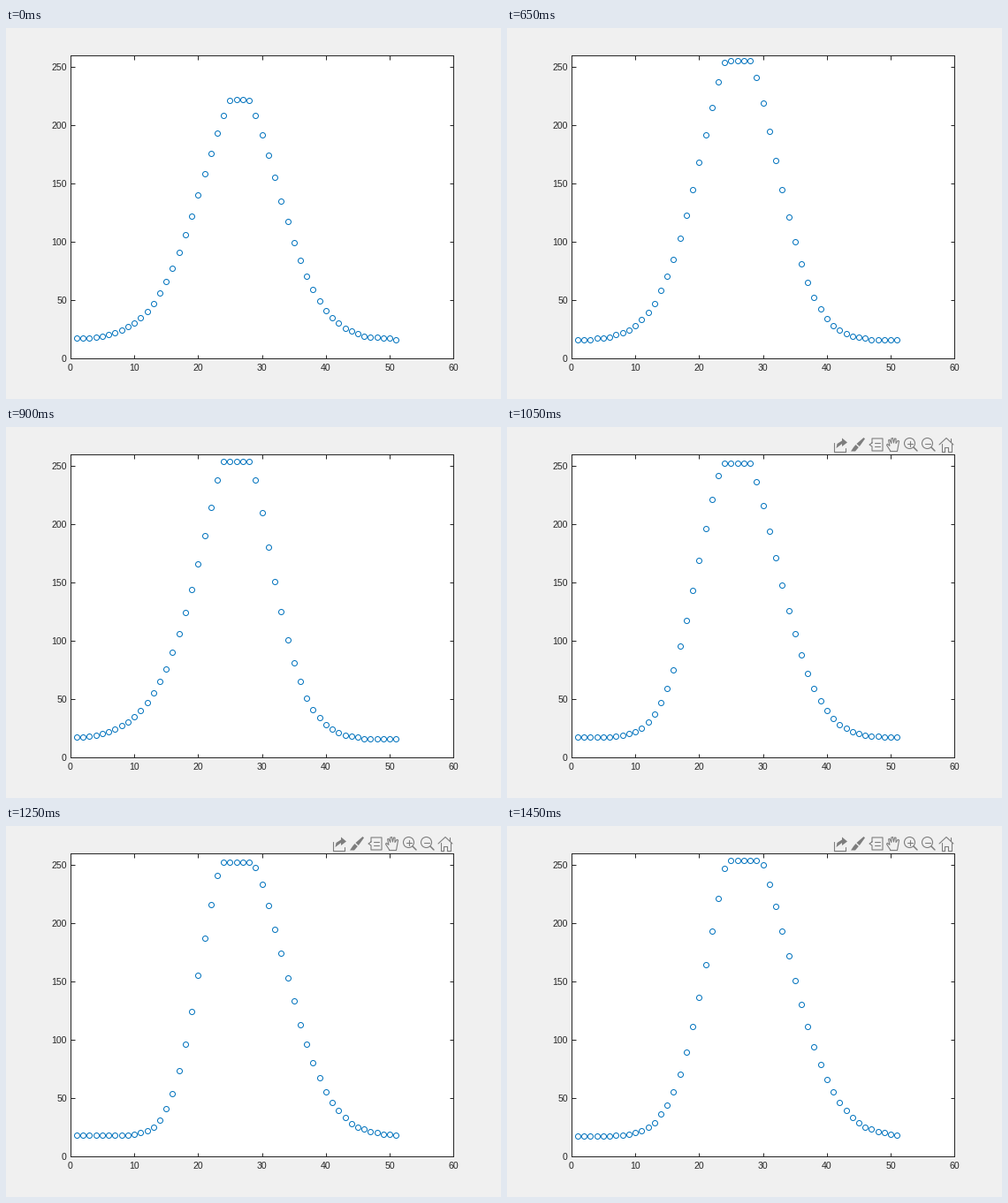
Animation, 560 px wide and 420 px high, one loop 1.5 s. Source, as a matplotlib script:

```python
import numpy as np
import matplotlib.pyplot as plt
from matplotlib.animation import FuncAnimation
from matplotlib.patches import Circle, Polygon

W, H, DPI = 560, 420, 80
PX = 72 / DPI  # points per pixel
FRAMES, INTERVAL = 30, 50
TOOLBAR_START = 21
INK, BLUE, GREY = "#262626", "#0072BD", "#7d7d7d"

plt.rcParams["font.family"] = "Liberation Sans"

X = np.arange(1, 52)


def bell(base, peak, cap, centre, left, left_power, right, right_power):
    """Lopsided bell that saturates at cap; left and right are half-widths."""
    d = X - centre
    width = np.where(d < 0, left, right)
    power = np.where(d < 0, left_power, right_power)
    fall = 0.5 ** (np.abs(d) / width) ** power
    return np.minimum(base + (peak - base) * fall, cap)


# Arguments of bell: at rest, then at each key frame
REST = (16, 230, 222, 26.5, 7.45, 1.72, 7.15, 1.78)
KEYS = {
    10: (16, 242, 231, 26.5, 6.55, 1.71, 7.55, 1.80),
    13: (15.5, 272, 255, 26, 7.05, 1.80, 7.05, 1.95),
    18: (15.5, 290, 254, 26, 6.6, 1.52, 5.95, 1.75),
    23: (17.5, 255, 250, 25.5, 6.75, 2.33, 8.6, 2.05),
    27: (18, 285, 255, 26, 5.45, 2.05, 8.8, 2.05),
    29: (17, 280, 254, 26.5, 6.05, 1.85, 8.6, 1.96),
}


def heights_at(frame):
    if frame < min(KEYS):
        return bell(*REST)
    return bell(*(np.interp(frame, list(KEYS), arg) for arg in zip(*KEYS.values())))


fig = plt.figure(figsize=(W / DPI, H / DPI), dpi=DPI, facecolor="#f0f0f0")

ax = fig.add_axes([72.8 / W, 46.2 / H, 433.6 / W, 343 / H])
ax.set(xlim=(0, 60), ylim=(0, 260), xticks=range(0, 61, 10), yticks=range(0, 251, 50))
ax.tick_params(direction="in", top=True, right=True, length=4.5 * PX, width=PX,
               color=INK, labelcolor=INK, labelsize=10.5 * PX)
ax.tick_params(axis="x", pad=6 * PX)
ax.tick_params(axis="y", pad=4 * PX)
for spine in ax.spines.values():
    spine.set(color=INK, linewidth=PX)
dots, = ax.plot(X, heights_at(0), "o", ms=6 * PX, mfc="none", mec=BLUE, mew=PX,
                zorder=3)

# Toolbar, laid out in stage pixels
bar = fig.add_axes([0, 0, 1, 1])
bar.set(xlim=(0, W), ylim=(H, 0))
bar.axis("off")


def stroke(points, width=1.1):
    x, y = zip(*points)
    bar.plot(x, y, color=GREY, lw=width * PX, solid_capstyle="round",
             solid_joinstyle="round")


def solid(points):
    bar.add_patch(Polygon(points, fc=GREY, ec="none"))


def export_icon():
    stroke([(370, 18), (370, 27.5), (383, 27.5), (383, 24)])
    solid([(372.5, 24), (373.5, 19), (379, 15.5), (379, 12.5),
           (385, 17.5), (379, 22), (379, 19)])


def brush_icon():
    solid([(403.5, 12), (405, 13.3), (398.8, 22), (395.5, 19)])
    solid([(394.5, 20), (397.8, 23), (394, 27.5), (389, 27.5), (392, 23)])


def data_tip_icon():
    stroke([(413, 18), (413, 13), (425, 13), (425, 27), (413, 27), (413, 22),
            (410, 20), (413, 18)])
    for y in (18, 22):
        stroke([(416, y), (422, y)])


def hand_icon():
    stroke([(434, 27.5), (429.5, 20.5), (430.3, 19.3), (433, 21.3), (431.6, 15),
            (432.8, 14.3), (434.8, 18.5), (434.8, 13), (436.5, 12.5), (437.4, 18),
            (438.6, 13), (440, 13.2), (440, 18.5), (442.2, 15.4), (443.6, 16),
            (441.5, 27.5), (434, 27.5)])


def zoom_icon(x, plus):
    y = 18.5
    bar.add_patch(Circle((x, y), 6, fc="none", ec=GREY, lw=1.1 * PX))
    stroke([(x + 4.5, y + 4.5), (x + 8.5, y + 8.5)], 1.5)
    stroke([(x - 3, y), (x + 3, y)])
    if plus:
        stroke([(x, y - 3), (x, y + 3)])


def home_icon():
    stroke([(489, 20), (497, 12.5), (505, 20)])
    stroke([(491.5, 18.5), (491.5, 27.5), (495, 27.5), (495, 22.5), (499, 22.5),
            (499, 27.5), (502.5, 27.5), (502.5, 18.5)])
    stroke([(502, 13), (502, 16.5)])


export_icon()
brush_icon()
data_tip_icon()
hand_icon()
zoom_icon(455.5, True)
zoom_icon(475.5, False)
home_icon()


def draw(frame):
    dots.set_ydata(np.round(heights_at(frame)))
    bar.set_visible(frame >= TOOLBAR_START)
    return dots, bar


anim = FuncAnimation(fig, draw, frames=FRAMES, interval=INTERVAL, repeat=True,
                     repeat_delay=0, blit=False)
plt.show()
```
